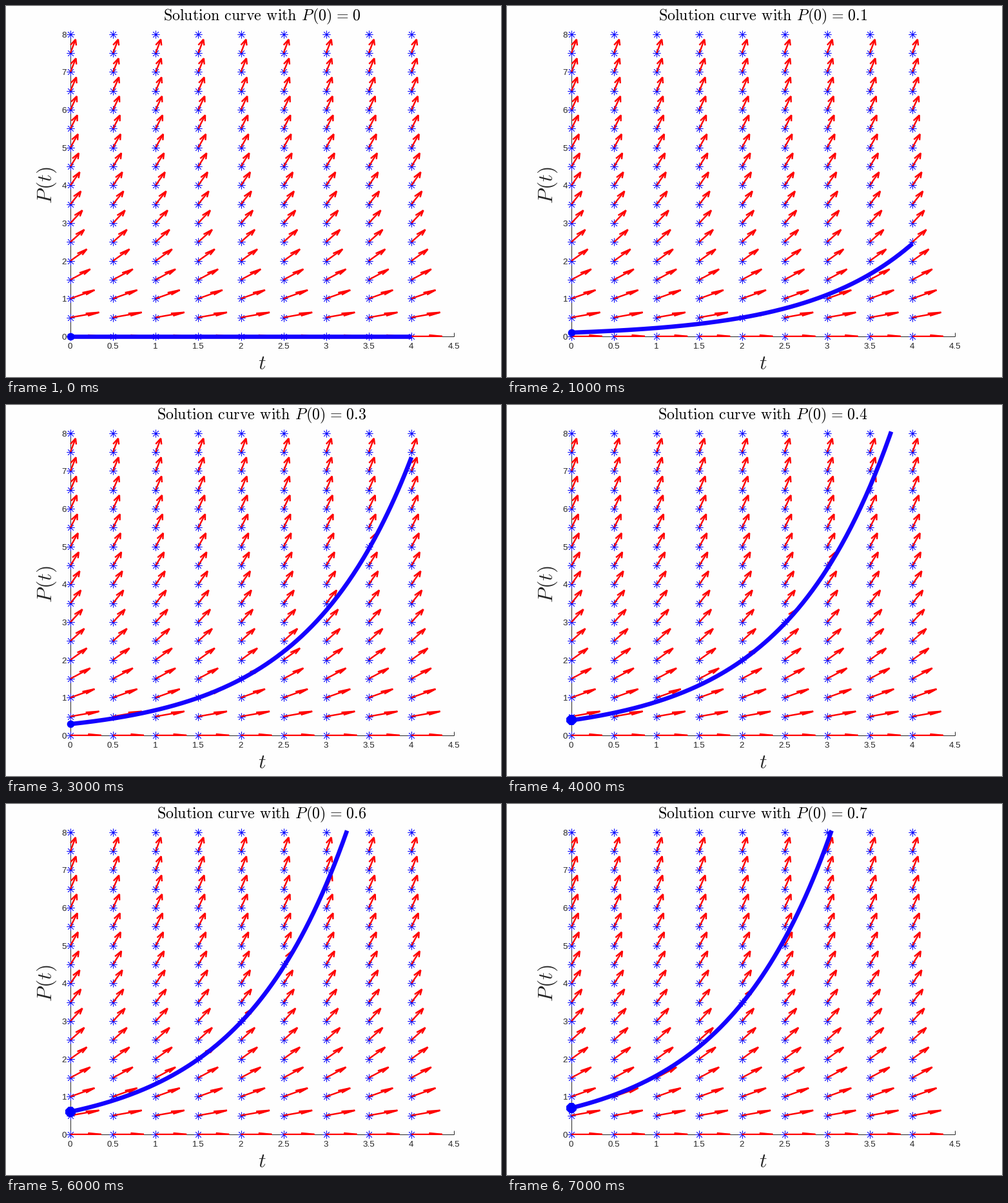
Write a matplotlib script that moves like this. It is 768 px wide and 576 px high and loops after 8000 ms.

```python
import numpy as np
import matplotlib.pyplot as plt
from matplotlib.animation import FuncAnimation
from matplotlib.collections import LineCollection
from matplotlib.patches import Rectangle

W, H, DPI = 768, 576, 96
RATE = 0.8
T_MAX, P_MAX = 4, 8
ARROW_LEN, HEAD_BACK, HEAD_SIDE = 0.3616, 0.43, 0.095
GRAY = "#262626"
RED = "#ff0000"
BLUE = "#0000ff"
CURVE_BLUE = "#1400ff"

plt.rcParams["mathtext.fontset"] = "cm"
plt.rcParams["font.family"] = "Liberation Sans"


def px(t):
    return 0.13 * W + 0.2 + np.asarray(t) * 0.775 * W / 4.5


def py(p):
    return 0.89 * H + 0.3 - np.asarray(p) * 0.815 * H / 8


def pt(pixels):
    return pixels * 72 / DPI


fig = plt.figure(figsize=(W / DPI, H / DPI), dpi=DPI, facecolor="#fefefe")
ax = fig.add_axes([0, 0, 1, 1])
ax.set_xlim(0, W)
ax.set_ylim(H, 0)
ax.axis("off")


def draw_axes():
    x0, y0 = float(px(0)), float(py(0))
    style = dict(color=GRAY, lw=pt(1), solid_capstyle="butt", zorder=1)
    ax.plot([x0, x0], [y0, py(8)], **style)
    ax.plot([x0, px(4.5)], [y0, y0], **style)
    label = dict(color=GRAY, fontsize=10, va="baseline")
    for t in np.arange(0, 4.6, 0.5):
        x = float(px(t))
        ax.plot([x, x], [y0, y0 - 6], **style)
        ax.text(x - 0.4, 532.5, f"{t:g}", ha="center", **label)
    for p in range(9):
        y = float(py(p))
        ax.plot([x0, x0 + 6], [y, y], **style)
        ax.text(94, y + 5.2, str(p), ha="right", **label)
    ax.text(397, 563.5, "$t$", fontsize=24, color=GRAY,
            ha="center", va="baseline")
    ax.text(70.6, 278.5, r"$P\hspace{0.06}(t)$", fontsize=24, color=GRAY,
            rotation=90, rotation_mode="anchor", ha="center", va="baseline")


def draw_field():
    t, p = np.meshgrid(np.arange(0, 4.1, 0.5), np.arange(0, 8.1, 0.5))
    t, p = t.ravel(), p.ravel()
    shafts, heads = [], []
    for a, b in zip(t, p):
        if b >= P_MAX:
            continue
        slope = RATE * b
        u = ARROW_LEN / np.hypot(1, slope)
        v = u * slope
        tip = np.array([a + u, b + v])
        back = tip - HEAD_BACK * np.array([u, v])
        side = HEAD_SIDE * np.array([-v, u])
        for group, points in ((shafts, [(a, b), tip]),
                              (heads, [back + side, tip, back - side])):
            xs, ys = np.transpose(points)
            group.append(np.column_stack([px(xs), py(ys)]))
    # arrows are cut off just below the time axis
    frame = Rectangle((0, 0), W, py(0) + 1.06, transform=ax.transData)
    for group in (shafts, heads):
        arrows = LineCollection(group, colors=RED, linewidths=pt(2.4),
                                joinstyle="bevel", capstyle="butt", zorder=3)
        arrows.set_snap(False)
        ax.add_collection(arrows)
        arrows.set_clip_path(frame)
    ax.plot(px(t), py(p), ls="none", marker=(8, 2, 0), ms=pt(12),
            mew=pt(0.7), color=BLUE, zorder=2)


draw_axes()
draw_field()

curve, = ax.plot([], [], color=CURVE_BLUE, lw=pt(6.67),
                 solid_capstyle="butt", zorder=4)
dot, = ax.plot([], [], ls="none", color=BLUE, mew=0, zorder=5)
title = ax.text(397.2, 22, "", fontsize=18, color="black",
                ha="center", va="baseline")


def title_text(p0):
    gap = r"\hspace{0.39}"
    words = gap.join(rf"\mathrm{{{w}}}" for w in
                     ("Solution", "curve", "with"))
    pad = r"\hspace{0.116}"
    return rf"${words}{gap}P\hspace{{0.06}}(0){pad}={pad}{p0:g}$"


def update(i):
    p0 = i / 10
    # the stroke runs slightly past the top of the axes
    top = P_MAX + 0.037
    end = min(T_MAX, np.log(top / p0) / RATE) if p0 else T_MAX
    t = np.linspace(0, end, 200)
    curve.set_data(px(t), py(p0 * np.exp(RATE * t)))
    dot.set_data([px(0)], [py(p0)])
    big = i >= 4
    dot.set_marker("8" if big else "o")
    dot.set_markersize(pt(17.2 if big else 11.6))
    title.set_text(title_text(p0))
    return curve, dot, title


anim = FuncAnimation(fig, update, frames=8, interval=1000,
                     repeat=True, repeat_delay=0)
plt.show()
```
